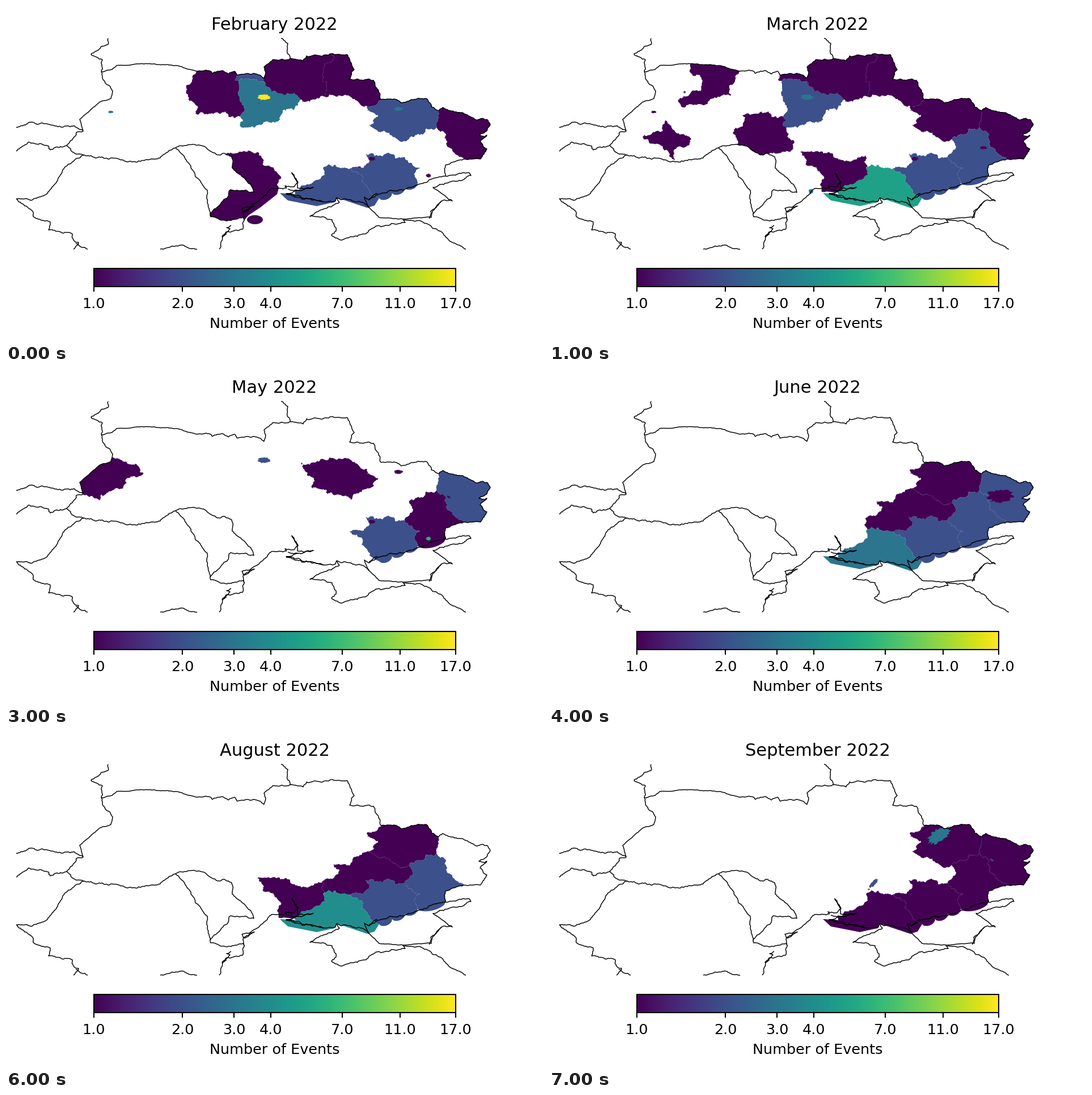
Animation, 947 px wide and 591 px high, one loop 8 s. Source, as a matplotlib script:

```python
import math
import random

import matplotlib.pyplot as plt
import numpy as np
from matplotlib.animation import FuncAnimation
from matplotlib.patches import Polygon, Rectangle

W, H, DPI = 947, 591, 128
PT = 72 / DPI  # points per pixel
TOP = 17       # highest value on the colour scale

fig = plt.figure(figsize=(W / DPI, H / DPI), dpi=DPI, facecolor="white")
ax = fig.add_axes([0, 0, 1, 1])
ax.axis("off")

arcs = {}
regions = {}


def rough(pts, amp, seed, step=3.2):
    """Halve each span until it is short, shifting the midpoints sideways."""
    rng = random.Random(seed)

    def halve(a, b):
        span = math.dist(a, b)
        if span <= step:
            return [b]
        k = max(-1.6, min(1.6, rng.gauss(0, 1))) * amp * min(1, 10 / span)
        mid = ((a[0] + b[0]) / 2 - (b[1] - a[1]) * k,
               (a[1] + b[1]) / 2 + (b[0] - a[0]) * k)
        return halve(a, mid) + halve(mid, b)

    out = [pts[0]]
    for a, b in zip(pts, pts[1:]):
        out += halve(a, b)
    return out


def arc(name, *xy, amp=0.2):
    arcs[name] = rough(list(zip(xy[::2], xy[1::2])), amp, name)


def border(name, *xy, amp=0.11):
    """An arc that is also drawn as a black line."""
    arc(name, *xy, amp=amp)
    x, y = zip(*arcs[name])
    ax.plot(x, y, color="black", lw=1.45 * PT, zorder=3,
            solid_joinstyle="round", solid_capstyle="butt")


def scallop(name, x0, y0, x1, y1, bumps, depth):
    """A sea limit made of equal round bumps to the left of the way."""
    dx, dy = x1 - x0, y1 - y0
    span = math.hypot(dx, dy)
    t = np.linspace(0, 1, 16 * bumps + 1)
    off = depth / span * np.sqrt(np.abs(np.sin(np.pi * bumps * t)))
    arcs[name] = list(zip(x0 + dx * t + dy * off, y0 + dy * t - dx * off))


def add_region(name, pts, z):
    patch = Polygon(pts, closed=True, lw=0, zorder=z, visible=False)
    regions[name] = ax.add_patch(patch)


def region(name, names):
    """Join arcs end to end, turning each one where needed."""
    first, *rest = [arcs[n] for n in names.split()]
    path = list(first)
    if rest and min(math.dist(path[-1], p) for p in (rest[0][0], rest[0][-1])) > 1:
        path.reverse()
    for part in rest:
        path += part if math.dist(part[0], path[-1]) < 1 else part[::-1]
    add_region(name, path, 1)


def blob(name, x, y, rx, ry, tilt=0, rag=0.2):
    """A ragged ellipse for a town or a small district."""
    rng = random.Random(name)
    c, s = math.cos(math.radians(tilt)), math.sin(math.radians(tilt))
    pts = []
    for t in np.linspace(0, 2 * math.pi, 36, endpoint=False):
        r = 1 + rag * rng.uniform(-1, 1)
        u, v = rx * r * math.cos(t), ry * r * math.sin(t)
        pts.append((x + u * c - v * s, y + u * s + v * c))
    add_region(name, pts, 2)


# State borders
border("pl_by", 180, 57, 180, 68, 150, 85, 170, 95, 168, 116)
border("pl_ua", 168, 116, 170, 127, 188, 150, 187, 156)
border("pl_lv", 187, 156, 185, 163, 166, 169, 130, 200, 136, 221, amp=0.05)
border("pl_sk", 18, 214, 43, 205, 77, 209, 92, 213, 120, 211, 136, 221)
border("sk_ua", 136, 221, 124, 223, 117, 236, 107, 246)
border("sk_hu", 18, 256, 40, 240, 75, 247, 78, 254, 107, 246)
border("hu_ua", 107, 246, 120, 259, 138, 263)
border("hu_ro", 138, 263, 102, 287, 91, 308, 70, 333, 44, 343, 18, 340)
border("ro_ua", 138, 263, 187, 268, 222, 275, 272, 268, 299, 250)
border("ro_rs", 18, 340, 48, 364, 50, 373, 78, 381, 75, 395, 117, 402, 119, 413,
       128, 417, 119, 429)
border("rs_bg", 123, 419, 144, 429)
border("south", 272, 429, 306, 422, 337, 429)
border("prut", 299, 250, 318, 272, 337, 303, 355, 325, 357, 355, 360, 367)
border("md_n", 299, 250, 312, 247, 331, 244)
border("md_vi", 331, 244, 354, 251, 377, 263, 386, 260)
border("md_od", 386, 260, 398, 266, 399, 286, 414, 298, 430, 314, 437, 329, 396, 324,
       391, 337, 376, 352, 360, 367)
border("danube", 360, 367, 361, 372, 380, 378, 418, 373, 420, 378)
border("by_vo", 168, 116, 187, 112, 195, 105, 250, 102, amp=0.06)
border("by_rv", 250, 102, 310, 107, 336, 115, amp=0.06)
border("by_zh", 336, 115, 358, 114, 364, 119, 382, 114, 392, 120, 403, 115, 407, 122)
border("by_zo", 407, 122, 425, 119, 448, 122, 455, 128)
border("by_ch", 455, 128, 458, 117, 455, 108, 470, 95, 502, 93)
border("by_ru", 485, 57, 497, 66, 496, 78, 502, 93)
border("ru_ch", 502, 93, 524, 97, 530, 88, 574, 84)
border("ru_su", 574, 84, 602, 86, 614, 112, 606, 129, 648, 131, 662, 165)
border("ru_kh", 662, 165, 684, 164, 697, 171, 739, 163, 750, 178, 763, 185)
border("ru_lu", 763, 185, 770, 179, 805, 188, 822, 197, 848, 200, 854, 209, 848, 220,
       834, 228, 848, 228, 836, 240, 848, 252, 837, 270)
border("ru_lu_s", 837, 270, 808, 270, amp=0.05)
border("ru_do", 808, 270, 776, 280, 775, 300)

# Coasts
border("ro_sea", 420, 378, 417, 394, 390, 398, 376, 429)
border("lagoon", 397, 387, 389, 391, 395, 393, 381, 407, 389, 402)
border("od_sea", 420, 378, 418, 366, 447, 343, 468, 322, 495, 321)
border("liman", 419, 364, 416, 357, 438, 353, 420, 364)
border("bug", 495, 321, 492, 317, 508, 319, 515, 312, 504, 294, 514, 312, 514, 321,
       542, 320, 520, 326, 497, 323)
border("kinburn", 516, 325, 494, 331, 520, 337, 558, 345, 581, 344, 583, 338)
border("tendra", 494, 332, 526, 341, 560, 346)
border("perekop", 583, 338, 632, 348, 640, 356)
border("crimea_w", 583, 338, 588, 346, 548, 363, 536, 371, 575, 377, 582, 397, 574, 404,
       590, 413)
border("crimea_s", 590, 413, 637, 400, 655, 388, 704, 382, 700, 376)
border("arabat", 640, 342, 632, 337, 640, 355, 658, 373, 700, 376, 750, 373, 752, 362,
       768, 344, amp=0.05)
border("azov_n", 775, 300, 748, 306, 730, 314, 655, 333, 640, 342, 655, 331)
border("azov_e", 775, 300, 815, 294, 820, 299, 803, 308, 753, 320, 787, 344, 768, 344,
       749, 362, 746, 375)
border("caucasus", 702, 378, 733, 380, 772, 404, 780, 412, 811, 429)

# Inner borders
arc("zh_rv", 336, 115, 328, 133, 318, 143, 321, 158)
arc("rv_w", 321, 158, 290, 163, 270, 174, 234, 178, 231, 162, 268, 150, 267, 125,
    251, 119, 250, 102)
arc("zh_s", 321, 158, 336, 176, 334, 190, 387, 186)
arc("zh_vi", 387, 186, 392, 195, 413, 195)
arc("zh_zo", 407, 122, 404, 130, 411, 133)
arc("zh_ky", 411, 133, 410, 158, 419, 179, 413, 195)
arc("zo_ky", 411, 133, 430, 130, 457, 139)
arc("zo_ch", 455, 128, 457, 139)
arc("ky_ch", 457, 139, 468, 151, 490, 157, 509, 153, 521, 165)
arc("ky_s", 521, 165, 507, 184, 488, 184, 478, 204, 425, 214, 413, 212)
arc("ky_vi", 413, 212, 418, 202, 413, 195)
arc("ch_po", 521, 165, 545, 165, 562, 160)
arc("ch_su", 574, 84, 577, 94, 561, 107, 558, 130, 566, 141, 562, 160)
arc("su_po", 562, 160, 606, 159, 622, 170, 637, 177)
arc("su_kh", 637, 177, 655, 173, 662, 165)
arc("po_kh", 637, 177, 637, 185, 656, 192, 640, 211)
arc("kh_dn", 640, 211, 668, 221, 695, 239, 711, 235)
arc("kh_do", 711, 235, 736, 226, 741, 216, 759, 214)
arc("kh_lu", 759, 214, 763, 196, 763, 185)
arc("do_lu", 759, 214, 775, 229, 776, 243, 788, 257, 808, 270)
arc("do_dn", 711, 235, 718, 248, 704, 268)
arc("do_za", 704, 268, 730, 286, 721, 302, 726, 312)
arc("za_dn", 634, 262, 684, 262, 687, 269, 704, 268)
arc("za_w", 634, 262, 640, 276, 631, 285, 606, 287)
arc("he_za", 606, 287, 628, 299, 627, 310, 641, 329)
arc("he_za_sea", 641, 329, 658, 339, amp=0.04)
arc("he_dn", 606, 287, 572, 281, 559, 286)
arc("my_he", 559, 286, 562, 298, 540, 312, 509, 323)
arc("my_dn", 559, 286, 558, 263)
arc("my_ki", 558, 263, 540, 271, 511, 271, 497, 260, 443, 258)
arc("my_sea", 509, 323, 511, 329, 481, 328, 481, 321, amp=0.04)
arc("od_vi", 386, 260, 427, 255)
arc("od_ki", 427, 255, 443, 258)
arc("od_my", 443, 258, 454, 281, 468, 284, 484, 300, 481, 321)
arc("ki_dn", 608, 231, 577, 234, 588, 243, 585, 251, 558, 263)
arc("ki_po", 567, 221, 582, 222, 608, 231)
arc("po_dn", 608, 231, 613, 221, 640, 211)
arc("po_w", 521, 165, 545, 198, 537, 208, 565, 213, 567, 221)
arc("ki_w", 427, 255, 424, 251, 440, 242, 510, 235, 545, 224, 550, 214, 567, 221)
arc("vi_e", 413, 212, 420, 231, 432, 238, 427, 255)
arc("vi_w", 387, 186, 341, 193, 342, 212, 326, 218, 331, 235, 331, 244)
arc("lv_e", 187, 156, 214, 167, 228, 167, 242, 183, 211, 195, 200, 212, 168, 221,
    164, 232, 136, 221)
arc("frankivsk", 201, 220, 205, 202, 217, 216, 251, 234, 248, 241, 221, 253, 222, 273,
    200, 247, 167, 235, 168, 227, 201, 220)

# Sea limits
arc("sea_od", 481, 321, 478, 332, 449, 355, 428, 369, 420, 378, amp=0)
arc("sea_he", 658, 339, 650, 352, 637, 356, 583, 338, 580, 346, 548, 353, 497, 343,
    483, 330, 510, 332, 509, 323, amp=0)
scallop("sea_za", 726, 312, 658, 339, 3, 7)
scallop("sea_do", 775, 300, 726, 312, 1, 9)

region("rivne", "by_rv zh_rv rv_w")
region("zhytomyr", "by_zh zh_zo zh_ky zh_vi zh_s zh_rv")
region("zone", "by_zo zo_ch zo_ky zh_zo")
region("kyiv", "zo_ky ky_ch ky_s ky_vi zh_ky")
region("chernihiv", "by_ch ru_ch ch_su ch_po ky_ch zo_ch")
region("sumy", "ru_su su_kh su_po ch_su")
region("poltava", "su_po po_kh po_dn ki_po po_w ch_po")
region("kharkiv", "ru_kh kh_lu kh_do kh_dn po_kh su_kh")
region("luhansk", "ru_lu ru_lu_s do_lu kh_lu")
region("donetsk", "do_lu ru_do sea_do do_za do_dn kh_do")
region("zapor", "za_dn do_za sea_za he_za_sea he_za za_w")
region("dnipro", "po_dn kh_dn do_dn za_dn za_w he_dn my_dn ki_dn")
region("kherson", "he_dn he_za he_za_sea sea_he my_he")
region("mykolaiv", "my_he my_dn my_ki od_my my_sea")
region("odesa", "od_vi od_ki od_my sea_od danube md_od")
region("kirov", "ki_w ki_po ki_dn my_ki od_ki")
region("vinnytsia", "zh_vi ky_vi vi_e od_vi md_vi vi_w")
region("lviv", "pl_lv lv_e")
region("frankivsk", "frankivsk")

blob("isle", 439, 377, 14, 8, rag=0)
blob("kyiv_c", 455, 161, 11, 5)
blob("lviv_c", 184.5, 187, 4.5, 2)
blob("lutsk_c", 239, 152, 2, 2)
blob("bucha_c", 441, 157, 2, 1)
blob("irpin_c", 446, 172, 1.5, 1.5)
blob("islet", 462.5, 117, 2.5, 1)
blob("kharkiv_c", 692, 181.5, 7, 3.5)
blob("zapor_c", 645, 269.5, 6.5, 3)
blob("plant_c", 623, 284, 3, 1)
blob("mariupol_c", 745, 299, 4.5, 3)
blob("horlivka_c", 766, 250, 6, 2.5)
blob("kramat_c", 745, 233.5, 3, 1)
blob("siever_c", 781, 226, 3.5, 1.5, 35)
blob("siever_r", 796, 224, 22, 11)
blob("odesa_c", 462, 327, 4, 4)
blob("kharkiv_r", 688, 182, 22, 11, -32)
blob("kryvyi_c", 572.5, 267, 10, 3.5, -45)
blob("kryvyi_s", 564, 277.5, 2, 1.2)

# Events per month: value -> regions
MONTHS = [
    ("February", {1: "zhytomyr chernihiv sumy luhansk odesa isle zapor_c plant_c "
                     "mariupol_c islet",
                  2: "zone kharkiv kherson zapor irpin_c",
                  3: "kyiv kharkiv_c lviv_c", 17: "kyiv_c"}),
    ("March", {1: "rivne frankivsk vinnytsia zone chernihiv sumy kharkiv luhansk mykolaiv "
                  "lviv_c zapor_c horlivka_c islet",
               2: "kyiv donetsk zapor lutsk_c", 3: "kyiv_c odesa_c", 5: "kherson"}),
    ("April", {1: "vinnytsia odesa isle poltava kharkiv luhansk dnipro zapor kherson "
                  "lviv_c bucha_c kramat_c",
               2: "donetsk", 3: "kyiv zone islet", 7: "kyiv_c"}),
    ("May", {1: "lviv poltava donetsk kharkiv_c zapor_c siever_c",
             2: "luhansk zapor kyiv_c", 6: "mariupol_c"}),
    ("June", {1: "kharkiv dnipro siever_r", 2: "luhansk donetsk zapor", 3: "kherson"}),
    ("July", {1: "kirov dnipro kharkiv luhansk donetsk zapor kyiv_c odesa_c",
              2: "mariupol_c", 5: "odesa isle", 10: "kherson"}),
    ("August", {1: "kharkiv dnipro mykolaiv", 2: "donetsk zapor", 4: "kherson"}),
    ("September", {1: "kharkiv luhansk donetsk zapor kherson",
                   2: "kryvyi_c kryvyi_s siever_c", 3: "kharkiv_r"}),
]


def scale(value):
    return math.log(value) / math.log(TOP)


def label(x, y, text, size):
    return ax.text(x, y, text, fontsize=size * PT, family="DejaVu Sans",
                   ha="center", va="baseline")


# Colour bar
X0, X1, Y0, Y1 = 155, 792.6, 463, 495
ax.imshow(np.linspace(0, 1, 256)[None, :], cmap="viridis", aspect="auto",
          interpolation="nearest", extent=(X0, X1, Y1, Y0))
ax.add_patch(Rectangle((X0, Y0), X1 - X0, Y1 - Y0, fill=False, ec="black",
                       lw=2.06 * PT, zorder=4))
for tick in (1, 2, 3, 4, 7, 11, 17):
    x = X0 + (X1 - X0) * scale(tick)
    ax.plot([x, x], [Y1, Y1 + 9], color="black", lw=2.06 * PT, solid_capstyle="butt")
    label(x, 533, f"{tick:.1f}", 25.45)
label(473.8, 568, "Number of Events", 25.45)
title = label(473.6, 42, "", 30.55)

ax.set_xlim(0, W)
ax.set_ylim(H, 0)


def update(i):
    month, events = MONTHS[i % len(MONTHS)]
    title.set_text(f"{month} 2022")
    for patch in regions.values():
        patch.set_visible(False)
    for value, names in events.items():
        for name in names.split():
            regions[name].set_facecolor(plt.cm.viridis(scale(value)))
            regions[name].set_visible(True)
    return [title, *regions.values()]


anim = FuncAnimation(fig, update, frames=len(MONTHS), interval=1000, repeat=True,
                     repeat_delay=0, blit=False)
plt.show()
```
